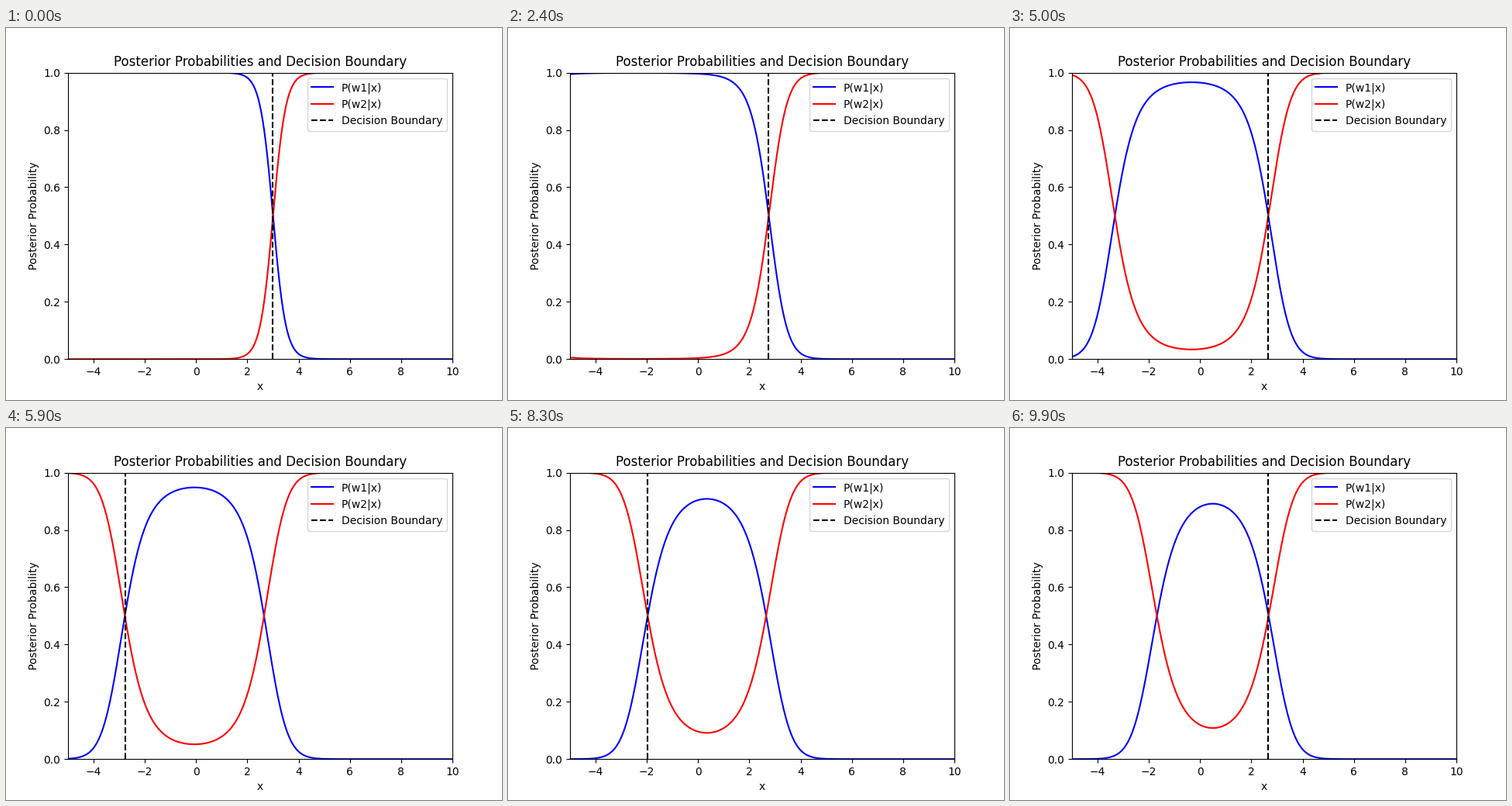
A matplotlib script that plays this animation: 640 by 480 pixels, repeating every 10000 ms.

```python
import matplotlib.pyplot as plt
import numpy as np
from matplotlib.animation import FuncAnimation

FRAMES = 100
MU1, MU2 = 1.0, 5.0
SIGMA1 = 1.0

plt.rcParams["font.family"] = "DejaVu Sans"
x = np.linspace(-5, 10, 500)


def gauss(mu, sigma):
    return np.exp(-0.5 * ((x - mu) / sigma) ** 2) / (sigma * np.sqrt(2 * np.pi))


def posteriors(sigma2):
    """Posterior of each class, with equal priors."""
    a, b = gauss(MU1, SIGMA1), gauss(MU2, sigma2)
    return a / (a + b), b / (a + b)


fig, ax = plt.subplots(figsize=(6.4, 4.8), dpi=100)
line1, = ax.plot([], [], color="blue", label="P(w1|x)")
line2, = ax.plot([], [], color="red", label="P(w2|x)")
boundary = ax.axvline(0, color="black", linestyle="--", label="Decision Boundary")
ax.set(
    xlim=(-5, 10),
    ylim=(0, 1),
    xlabel="x",
    ylabel="Posterior Probability",
    title="Posterior Probabilities and Decision Boundary",
)
ax.legend(loc="upper right")


def update(i):
    p1, p2 = posteriors(1 + 0.02 * i)
    line1.set_data(x, p1)
    line2.set_data(x, p2)
    # The grid point closest to a crossing; it may jump between the two.
    xb = x[np.argmin(np.abs(p1 - p2))]
    boundary.set_xdata([xb, xb])
    return line1, line2, boundary


anim = FuncAnimation(fig, update, frames=FRAMES, interval=100, repeat=True, repeat_delay=0)
plt.show()
```
